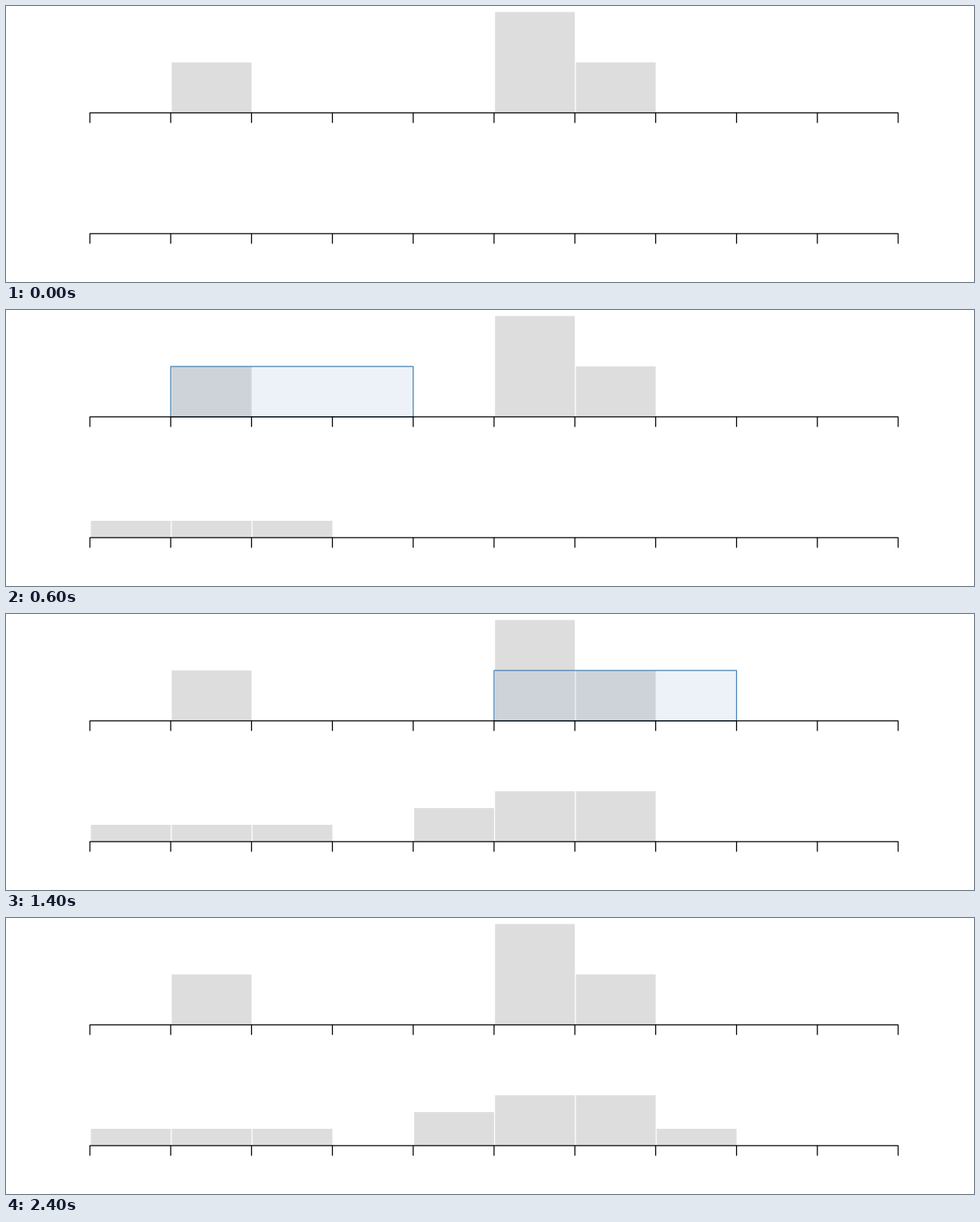
Animation, 1200 px wide and 343 px high, one loop 2.6 s. Source, as a matplotlib script:

```python
import numpy as np
import matplotlib.pyplot as plt
from matplotlib.animation import FuncAnimation
from matplotlib.patches import Rectangle

W, H, DPI = 1200, 343, 64
UNIT = 1.2525                 # pixels per drawing unit
X0, STEP = 104.0, 80 * UNIT   # left end of the axes, bin width
TOP, BOTTOM = 132.8, 282.9    # baselines
LEVEL = 50 * UNIT             # height of one count
GAP = UNIT
TICK = 10 * UNIT
LINE = UNIT * 72 / DPI
BINS = 10
RIGHT = 944 * UNIT            # right edge of the drawing area

counts = np.zeros(BINS)
counts[[1, 5, 6]] = 1, 2, 1
smooth = np.convolve(counts, np.ones(3) / 3, mode="same")

fig = plt.figure(figsize=(W / DPI, H / DPI), dpi=DPI, facecolor="white")
ax = fig.add_axes([0, 0, 1, 1])
ax.set_xlim(0, W)
ax.set_ylim(H, 0)
ax.axis("off")


def edge(i):
    return X0 + i * STEP


def add_bars(values, base):
    bars = []
    for i, v in enumerate(values):
        bar = Rectangle((edge(i) + GAP, base - v * LEVEL), STEP - GAP, v * LEVEL,
                        facecolor="#dddddd", linewidth=0, snap=False, zorder=1)
        bars.append(ax.add_patch(bar))
    return bars


def add_axis(base):
    style = dict(color="black", linewidth=LINE, snap=False, zorder=3,
                 solid_capstyle="butt", solid_joinstyle="miter")
    a, b = edge(0), edge(BINS)
    ax.plot([a, a, b, b], [base + TICK, base, base, base + TICK], **style)
    for i in range(1, BINS):
        ax.plot([edge(i)] * 2, [base, base + TICK], **style)


add_bars(counts, TOP)
averages = add_bars(smooth, BOTTOM)
add_axis(TOP)
add_axis(BOTTOM)

blue = (70 / 255, 130 / 255, 180 / 255)
window = Rectangle((edge(-1), TOP - LEVEL), 3 * STEP, LEVEL, facecolor=blue + (0.1,),
                   edgecolor=blue, linewidth=LINE, joinstyle="miter",
                   snap=False, zorder=2)
ax.add_patch(window)
window.set_clip_path(Rectangle((0, 0), RIGHT, H, transform=ax.transData))


def draw(frame):
    pos = frame - 1
    window.set_visible(0 <= pos <= BINS)
    window.set_x(edge(pos - 1))
    for i, bar in enumerate(averages):
        bar.set_visible(i <= pos and smooth[i] > 0)
    return [window, *averages]


anim = FuncAnimation(fig, draw, frames=BINS + 3, interval=200,
                     init_func=lambda: draw(0), repeat=True, repeat_delay=0)
plt.show()
```
